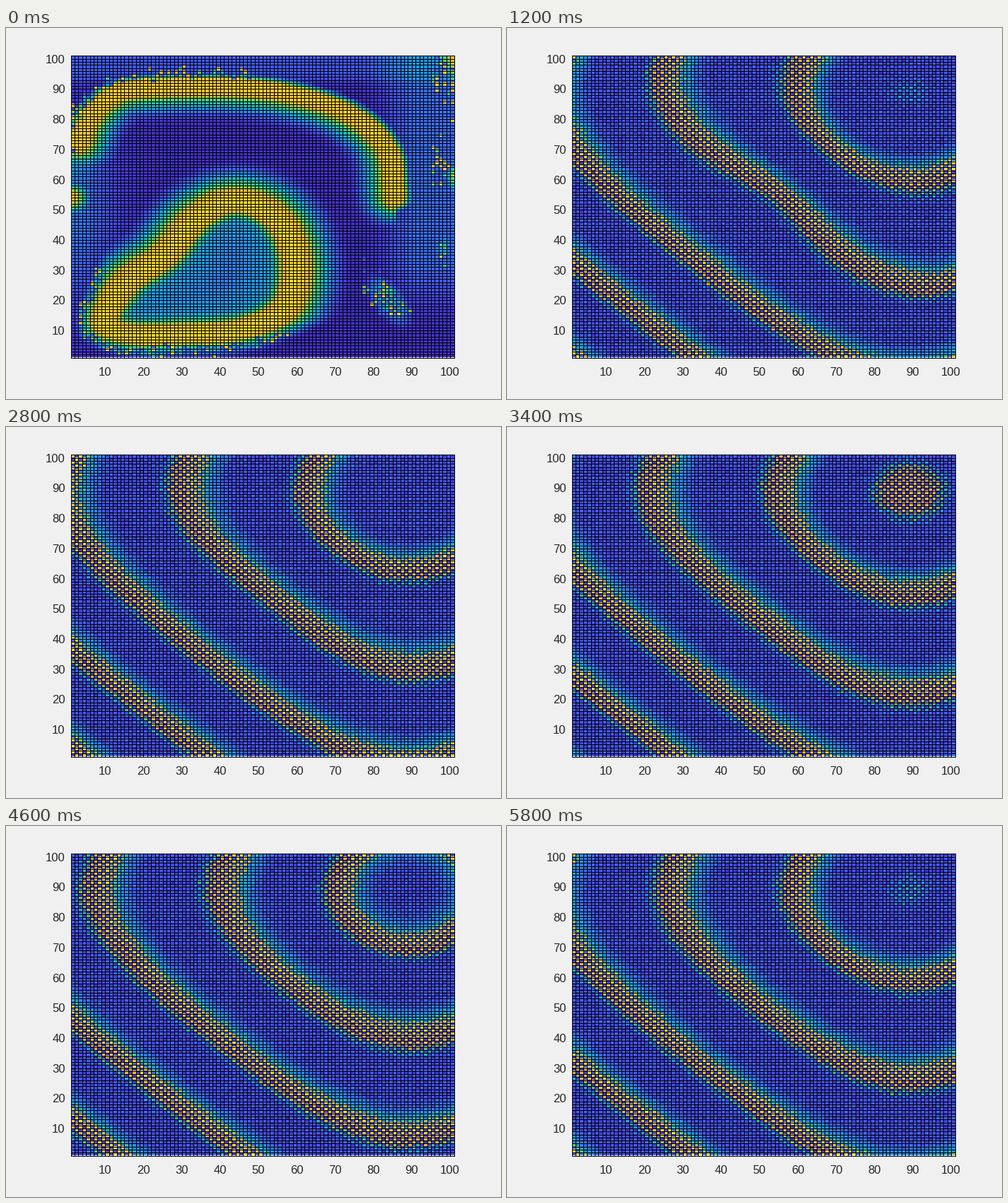
A matplotlib script for the animation above (6000 ms loop, 700x525 px).

```python
import numpy as np
import matplotlib.pyplot as plt
from matplotlib.animation import FuncAnimation
from matplotlib.colors import LinearSegmentedColormap
from matplotlib.path import Path

W, H, DPI = 700, 525, 100
N, FRAMES, STEP = 100, 30, 200
WAVE = 30.5  # distance between two crests

plt.rcParams["font.family"] = "Liberation Sans"
PARULA = ["#3e26a8", "#463adb", "#4362fd", "#2d87f7", "#1caadf", "#1fbcad",
          "#48cb86", "#93c947", "#eaba30", "#fecc30", "#f9fb15"]
cmap = LinearSegmentedColormap.from_list("parula", PARULA)

gx, gy = np.meshgrid(np.arange(N) + 1.5, np.arange(N) + 1.5)
checker = np.indices((N, N)).sum(axis=0) % 2 == 1


def hump(x, width, power=2):
    return np.exp(-np.abs(x / width)**power)


def blob(x, y, rx, ry, tilt=0.0):
    u, v = gx - x, gy - y
    return hump(u + tilt * v, rx) * hump(v, ry)


def curve(points, closed=False, n=240):
    """Smooth line through the points (Catmull-Rom)."""
    p = np.array(points, float)
    if closed:
        p = np.vstack([p[-1], p, p[:2]])
    else:
        p = np.vstack([2 * p[0] - p[1], p, 2 * p[-1] - p[-2]])
    t = np.linspace(0, len(p) - 3 - 1e-6, n)
    i = t.astype(int)
    u = (t - i)[:, None]
    a, b, c, d = p[i], p[i + 1], p[i + 2], p[i + 3]
    return 0.5 * (2 * b + (c - a) * u + (2 * a - 5 * b + 4 * c - d) * u**2
                  + (3 * b - a - 3 * c + d) * u**3)


def nearest(line):
    d2 = (gx[..., None] - line[:, 0])**2 + (gy[..., None] - line[:, 1])**2
    return np.sqrt(d2.min(axis=2)), line[d2.argmin(axis=2)]


# Opening pattern: a closed ring below an arc, as signed distances
ring = curve([(9, 13), (15, 26), (25, 35), (33, 47), (42, 53), (51, 51),
              (57.5, 43), (60, 30), (57, 17), (46, 9.5), (30, 8), (16, 8)], True)
ring_d, _ = nearest(ring)
inside = Path(ring).contains_points(np.c_[gx.ravel(), gy.ravel()]).reshape(N, N)
ring_d = np.where(inside, -ring_d, ring_d)
tight = 1 + 0.7 * np.clip((14 - np.minimum(gy, gx + 4)) / 8, 0, 1)

arc = curve([(3, 72), (6, 81), (12, 88), (21, 90.5), (45, 90.7), (63, 87),
             (76, 80), (84, 69), (85.7, 54)])
arc_d, near = nearest(arc)
outer = (np.hypot(gx - 45, gy - 50)
         > np.hypot(near[..., 0] - 45, near[..., 1] - 50))
arc_d = np.where(outer, arc_d, -arc_d)


def opening(k):
    rng = np.random.default_rng(7 + k)
    d, a = ring_d - 10 * k, arc_d - 10 * k
    d = np.where(d > 0, d * tight, d)
    bg = (0.06 + 0.17 * np.clip((gx - 78) / 12, 0, 1) * np.clip((gy - 12) / 20, 0, 1)
          + 0.22 * blob(0, 48, 12, 30) + 0.12 * np.clip((gy - 90) / 5, 0, 1)
          + 0.15 * blob(1, 66, 6, 6))
    body = np.where(d > 0, 0.92 * hump(d, 8.5),
                    0.39 * hump(d, 30) + 0.53 * hump(d, 5.5, 4))
    top = 0.9 * np.where(a > 0, hump(a, 4, 4), hump(a, 7.5))
    spots = (0.9 * blob(1, 54, 4.5, 5) + 0.6 * blob(84, 20, 4, 7, 0.4)
             + 0.9 * blob(102, 98, 4, 9, 0.4) + 0.7 * blob(101, 61, 2, 5)
             + 0.4 * blob(98, 38, 3, 5))
    v = np.maximum.reduce([bg, body, top, spots * 0.3**k])

    # ragged checkered cells along the outer rims
    rim = (0.8 * hump(a - 4, 1.5) * (gx < 50)
           + 0.8 * hump(d - 8, 2.5) * (np.minimum(gx, gy) < 9)
           + blob(83, 21, 4, 6, 0.4) + 0.8 * blob(99, 95, 3, 8)
           + 0.6 * blob(98, 66, 4, 7) + 0.5 * blob(98, 36, 2, 5))
    hit = rng.random((N, N)) < 0.7 * rim
    return np.where(hit, np.where(checker, rng.uniform(.5, .95, (N, N)), .2), v)


def level(k):
    """Travel distance from the source in the upper right corner."""
    X, Y = 101 - gx, 101 - gy
    q = (np.hypot(X - 12, 25) + np.hypot(Y - 12, 25)
         - 14 * hump(np.hypot(X - 12, Y - 12), 22))
    bend = np.exp((6 - k) / 6)
    dent = 8 * hump(X - Y, 32) - 4 * hump(np.minimum(X, Y), 15)
    return q + bend * dent * hump(q - 86, 18)


def waves(k):
    rng = np.random.default_rng(100 + k)
    turn = 0.43 + 0.4 * k - 0.82 * np.exp((6 - k) / 4.4)
    s = level(k) / WAVE - turn
    s = s - np.round(s) + rng.normal(0, 0.012, (N, N))
    high = (0.2 + (0.7 - 0.9 * s) * hump(s, 0.17, 4)
            + 0.12 * hump(s + 0.24, 0.07))
    low = 0.1 + 0.2 * hump(s + 0.18, 0.11)
    return np.where(checker, high, low) + rng.normal(0, 0.02, (N, N))


def field(k):
    w = np.clip((k - 1) / 3, 0, 1)
    return np.clip((1 - w) * opening(k) + w * waves(k), 0, 1)


fig = plt.figure(figsize=(W / DPI, H / DPI), dpi=DPI, facecolor="#f0f0f0")
ax = fig.add_axes([91.5 / W, 58.5 / H, 542 / W, 427 / H])
img = ax.imshow(field(0), cmap=cmap, vmin=0, vmax=1, origin="lower",
                extent=[1, N + 1, 1, N + 1], aspect="auto", interpolation="nearest")
edges = np.arange(1, N + 2)
style = dict(colors="black", linewidth=0.72, antialiased=False, clip_on=False)
ax.vlines(edges, 1, N + 1, **style)
ax.hlines(edges, 1, N + 1, **style)
ax.set(xlim=(1, N + 1), ylim=(1, N + 1),
       xticks=range(10, 101, 10), yticks=range(10, 101, 10))
ax.tick_params(length=0, labelsize=12, labelcolor="#262626")
ax.tick_params(axis="x", pad=9.6)
ax.tick_params(axis="y", pad=5.6)
ax.spines[:].set_visible(False)


def update(k):
    img.set_data(field(k))
    return [img]


anim = FuncAnimation(fig, update, frames=FRAMES, interval=STEP,
                     repeat=True, repeat_delay=0, blit=False)
plt.show()
```
